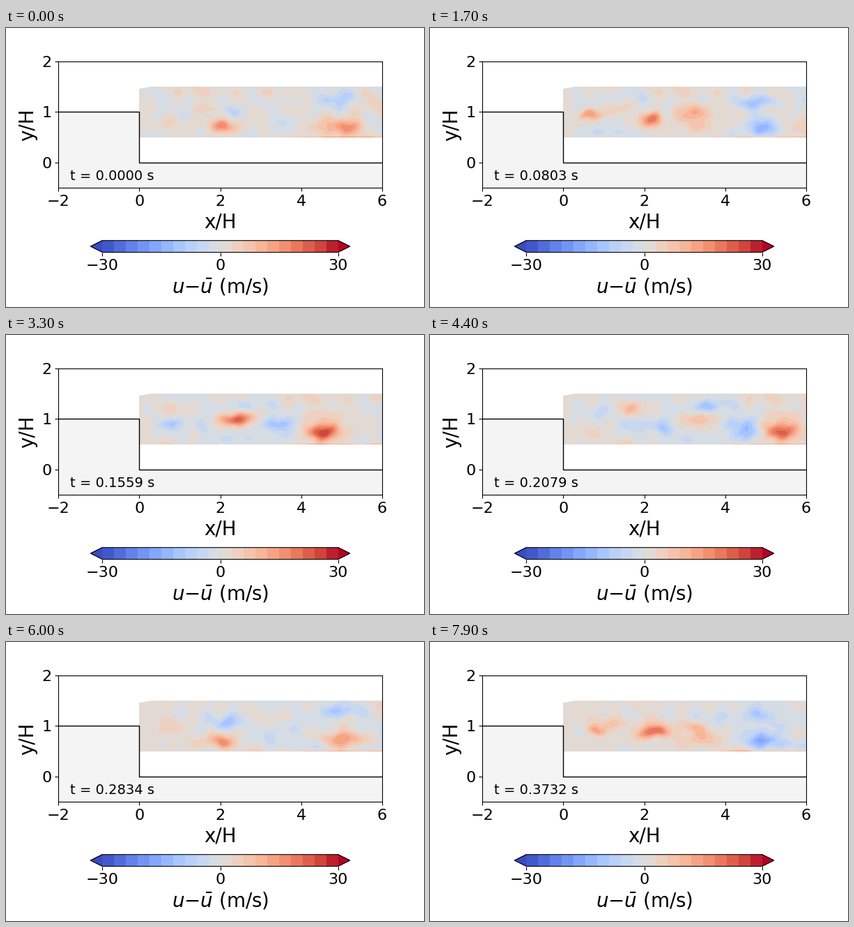
Animation of 600x400 px, one loop 8000 ms. Source, as a matplotlib script:

```python
import numpy as np
import matplotlib.pyplot as plt
from matplotlib.animation import FuncAnimation

plt.rcParams["font.family"] = "DejaVu Sans"
WIDTH, HEIGHT, DPI = 600, 400, 100
FRAMES, INTERVAL = 80, 100
DT = 0.004724        # physical seconds per frame
SPEED = 0.083        # convection of the eddies, in x/H per frame
CYCLE = 61           # frames between two similar shedding events
LIFE = 12            # frames over which an eddy rises and decays
LEVELS = np.linspace(-30, 30, 21)

# Main eddies of one shedding cycle: frame of peak strength, x, y, velocity
EDDIES = [
    (0, 2.1, .70, 16), (0, 5.1, .72, 17), (0, 2.25, 1.05, -9), (0, 5.0, 1.3, -8),
    (17, .7, .93, 14), (17, 2.15, .88, 22), (17, 3.2, .95, 11),
    (17, 4.75, 1.2, -11), (17, 4.9, .7, -15),
    (33, .75, .92, -8), (33, 2.4, 1.0, 23), (33, 3.4, .9, -14), (33, 4.6, .72, 20),
    (44, 1.7, 1.2, 9), (44, 2.4, .83, -11), (44, 3.6, 1.2, -11),
    (44, 4.5, .75, -13), (44, 5.3, .78, 15)]

rng = np.random.default_rng(4)
WAVES = np.column_stack([rng.normal(0, 5, 24), rng.normal(0, 9, 24),
                         rng.uniform(0, 2 * np.pi, 24)])

X, Y = np.meshgrid(np.linspace(0, 6, 220), np.linspace(.5, 1.5, 76))
WALL = 9 * np.exp(-((Y - .5) / .011) ** 2) / (1 + np.exp(-(X - 3.9) * 8))


def velocity(frame):
    x = X - SPEED * frame
    # Bend the outlines so that the eddies look turbulent
    xw = X + .06 * np.sin(11 * Y + 3 * x) + .03 * np.sin(9 * x - 17 * Y)
    yw = Y + .03 * np.sin(7 * x + 4 * Y) + .015 * np.sin(15 * x - 9 * Y)
    u = .4 + WALL
    for peak, cx, cy, strength in EDDIES:
        age = (frame - peak + CYCLE / 2) % CYCLE - CYCLE / 2
        cx += SPEED * age
        # Eddies grow as they travel downstream
        sx, sy = .23 + .04 * max(cx, 0), .09 + .015 * max(cx, 0)
        shape = np.exp(-((xw - cx) / sx) ** 2 - ((yw - cy) / sy) ** 2)
        u = u + strength * np.exp(-(age / LIFE) ** 2) * shape
    ripple = sum(np.cos(kx * x + ky * Y + phase) for kx, ky, phase in WAVES)
    return u + .45 * ripple * np.clip(X / .8, 0, 1)


fig = plt.figure(figsize=(WIDTH / DPI, HEIGHT / DPI), dpi=DPI, facecolor="white")
ax = fig.add_axes([.125, 170.8 / HEIGHT, .775, 181.2 / HEIGHT])
ax.set(xlim=(-2, 6), ylim=(-.5, 2), xticks=range(-2, 7, 2), yticks=range(3))
ax.tick_params(labelsize=16)
ax.set_xlabel("x/H", fontsize=20)
ax.set_ylabel("y/H", fontsize=20)

ax.fill([-2, 0, 0, 6, 6, -2], [1, 1, 0, 0, -.5, -.5], color="0.957", lw=0)
ax.plot([-2, 0, 0, 6], [1, 1, 0, 0], color="black", lw=1)
ax.fill([-.01, .3, -.01], [1.46, 1.503, 1.53], color="white", lw=0, zorder=1.5)
clock = ax.text(-1.7, -.35, "", fontsize=14)


def draw_field(frame):
    return ax.contourf(X, Y, velocity(frame), LEVELS, cmap="coolwarm", extend="both")


field = draw_field(0)
cax = fig.add_axes([121.5 / WIDTH, 78.4 / HEIGHT, 372 / WIDTH, 16.9 / HEIGHT])
bar = fig.colorbar(field, cax=cax, orientation="horizontal", ticks=[-30, 0, 30])
bar.ax.tick_params(labelsize=16)
bar.set_label("$u$\u2212$\\bar{u}$ (m/s)", fontsize=20)


def update(frame):
    global field
    field.remove()
    field = draw_field(frame)
    clock.set_text(f"t = {frame * DT:.4f} s")
    return field, clock


anim = FuncAnimation(fig, update, frames=FRAMES, interval=INTERVAL,
                     init_func=lambda: (), repeat=True, repeat_delay=0)
plt.show()
```
